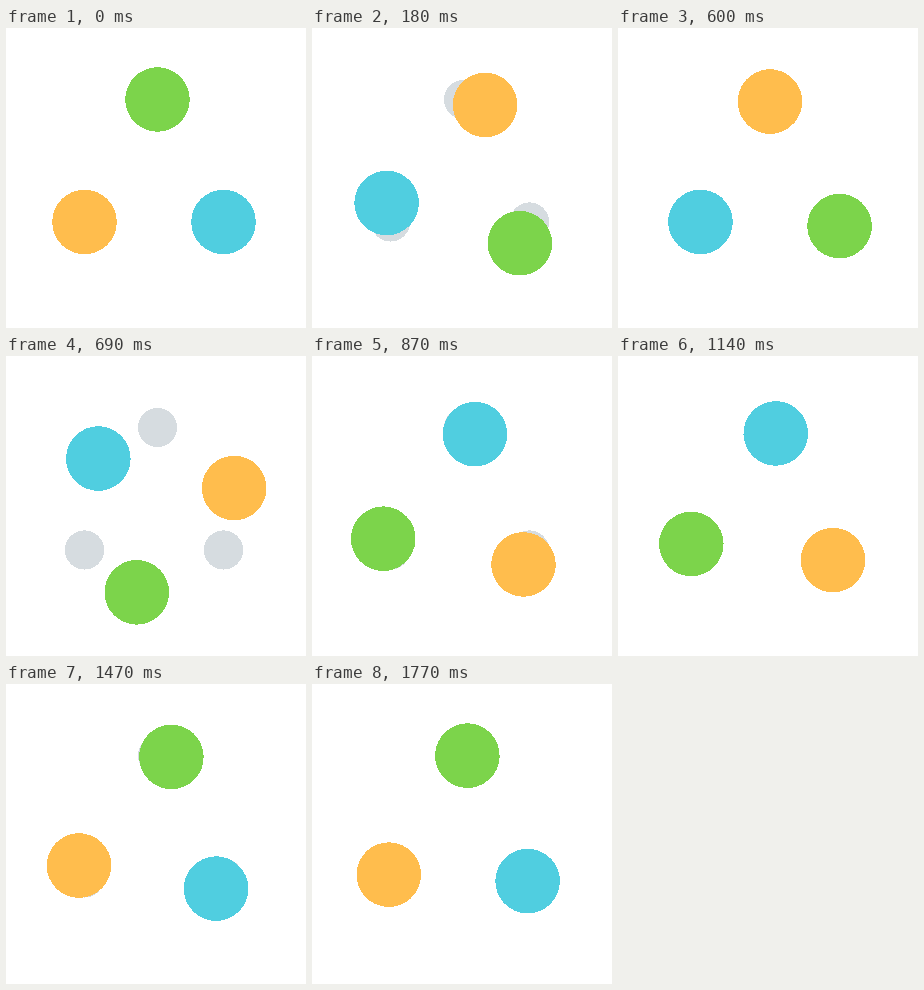
Animation, 300 px wide and 300 px high, one loop 1800 ms. Source, as an HTML page:

```html
<!DOCTYPE html>
<html lang="en">
<head>
<meta charset="utf-8">
<title>Three dots</title>
<style>
  html, body { margin: 0; width: 100%; height: 100%; overflow: hidden; background: #fff; }
  svg { display: block; width: 100vw; height: 100vh; shape-rendering: crispEdges; }
</style>
</head>
<body>
<svg viewBox="0 0 300 300">
  <g fill="#d6dce0">
    <circle cx="151.5" cy="71.5" r="19.6"/>
    <circle cx="217.5" cy="194" r="19.6"/>
    <circle cx="78.5" cy="194" r="19.6"/>
  </g>
  <g id="wheel">
    <circle cx="151.5" cy="71.5" r="32.3" fill="#7cd44b"/>
    <circle cx="217.5" cy="194" r="32.3" fill="#50cee0"/>
    <circle cx="78.5" cy="194" r="32.3" fill="#ffbd4d"/>
  </g>
</svg>
<script>
const STEP = 30, LOOP = 1800, TURN = 600;
const wheel = document.getElementById('wheel');

// A third of a turn: overshoot, swing back, rebound, settle
const swings = [
  { end: 210, angle: 140, power: 1.4 },
  { end: 420, angle: 116, power: 1 },
  { end: 540, angle: 125.7, power: 1.4 },
  { end: TURN, angle: 120, power: 1.8 }
];

const ease = (u, power) => Math.sin(u * Math.PI / 2) ** power;

function turnAngle(t) {
  const i = swings.findIndex(s => t < s.end);
  const to = swings[i], from = swings[i - 1] || { end: 0, angle: 0 };
  const u = (t - from.end) / (to.end - from.end);
  return from.angle + (to.angle - from.angle) * ease(u, to.power);
}

const start = performance.now();

function draw() {
  const elapsed = Math.max(0, performance.now() - start) % LOOP;
  const t = Math.floor(elapsed / STEP) * STEP;
  const angle = Math.floor(t / TURN) * 120 + turnAngle(t % TURN);
  wheel.setAttribute('transform', `rotate(${angle} 150 155)`);
  requestAnimationFrame(draw);
}
draw();
</script>
</body>
</html>
```
